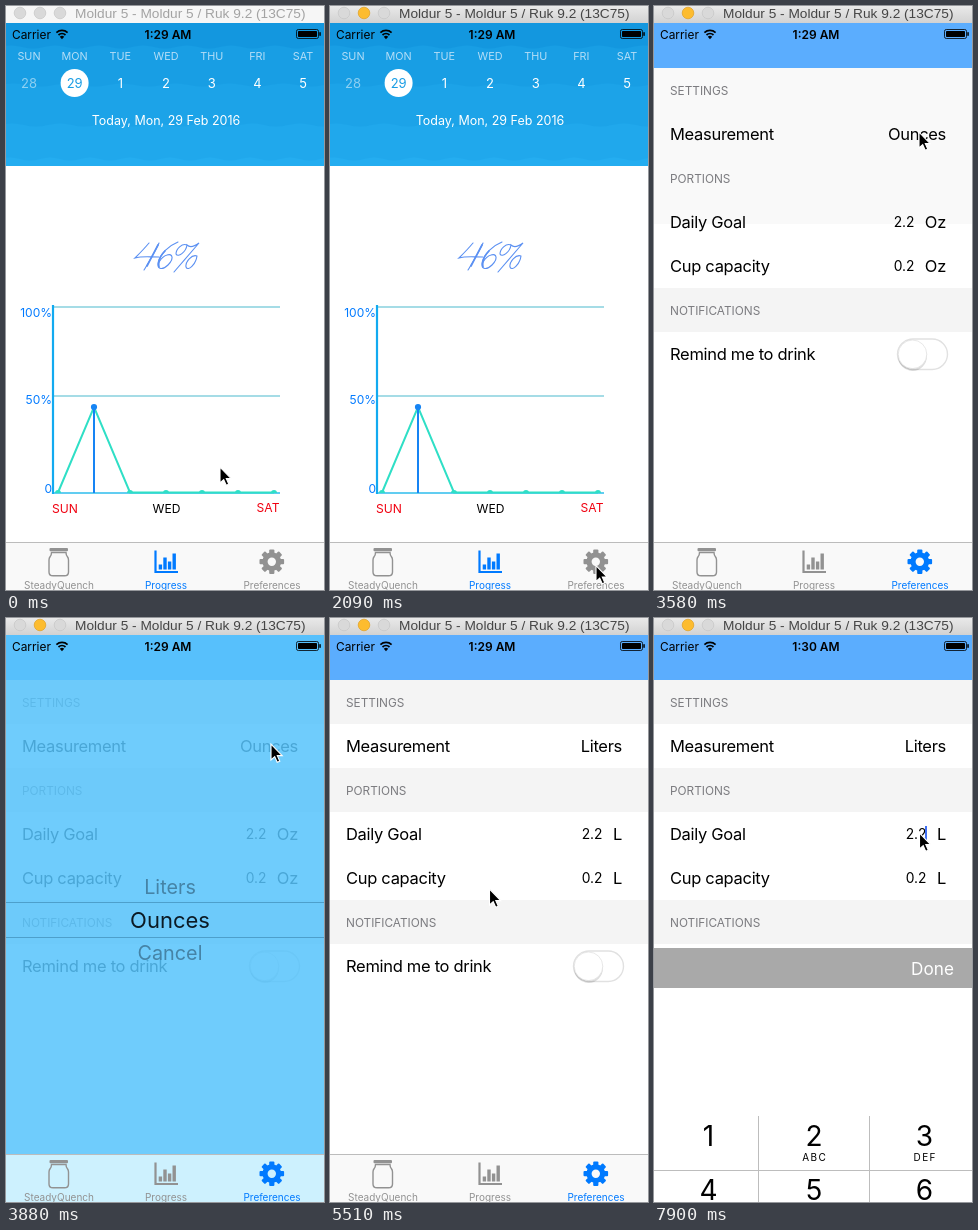
Write an HTML page that moves like this. It is 318 by 584 pixels and loops after 8 s.

```html
<!DOCTYPE html>
<html lang="en">
<head>
<meta charset="utf-8">
<title>Hydration app</title>
<style>
  html, body { margin: 0; width: 100%; height: 100%; overflow: hidden; background: #fff; }
  svg { display: block; width: 100vw; height: 100vh; font-family: Inter, Roboto, sans-serif; }
  .mid { text-anchor: middle; }
  .end { text-anchor: end; }
  .row { font-size: 16.5px; letter-spacing: -.3px; }
  .head { font-size: 11.8px; fill: #7b7b7f; }
  .line { fill: none; stroke: currentColor; }
</style>
</head>
<body>
<svg id="stage" viewBox="0 0 318 584"></svg>
<script>
const LOOP = 8000, STEP = 148.3;
const BLUE = '#007aff', GRAY = '#929292';

const rect = (x, y, w, h, fill, more = '') =>
  `<rect x="${x}" y="${y}" width="${w}" height="${h}" fill="${fill}" ${more}/>`;
const dot = (x, y, r, fill, more = '') =>
  `<circle cx="${x}" cy="${y}" r="${r}" fill="${fill}" ${more}/>`;
const line = (x1, y1, x2, y2, color, w = 1) =>
  `<path d="M${x1} ${y1}L${x2} ${y2}" stroke="${color}" stroke-width="${w}" fill="none"/>`;
const text = (x, y, s, size, cls = '', more = '') =>
  `<text x="${x}" y="${y}" font-size="${size}" class="${cls}" ${more}>${s}</text>`;
const group = (id, body, more = '') => `<g id="${id}" ${more}>${body}</g>`;
const range = n => [...Array(n).keys()];

// Title bar of the simulator window
const titleBar = () =>
  rect(0, 0, 318, 17, '#f6f6f6', 'id="bar"') +
  range(3).map(i => dot(14 + 20 * i, 7, 5.8, '#d9d9d9', `id="light${i}" stroke="#c6c6c6" stroke-width=".7"`)).join('') +
  text(69, 12, 'Moldur 5 - Moldur 5 / Ruk 9.2 (13C75)', 13.7, '',
    'id="title" font-family="Liberation Sans, Arial, sans-serif"');

const statusBar = () =>
  text(6, 32.5, 'Carrier', 11.9) +
  `<g class="line" stroke-width="1.7"><path d="M50.4 26.6a8.2 8.2 0 0 1 11.2 0M52.5 29a5.2 5.2 0 0 1 7 0"/></g>
   <path d="M53.8 30.8a3.2 3.2 0 0 1 4.4 0L56 33.2z"/>` +
  text(162, 32.5, '1:29 AM', 12, 'mid', 'id="clock" font-weight="600"') +
  rect(290.5, 23.5, 22, 9, 'none', 'rx="1.8" stroke="#000" stroke-width=".8"') +
  rect(292, 25, 19, 6, '#000', 'rx=".7"') +
  rect(313.3, 26, 1.5, 4, '#000', 'rx=".7"');

// Water layer with a scalloped upper edge
const wave = (y, width, fill) => {
  const n = Math.ceil(330 / width);
  const bumps = range(n).map(i => `q${width / 2} ${i % 2 ? 3 : -3} ${width} 0`).join('');
  return `<path d="M-6 ${y}${bumps}V160H-6z" fill="${fill}"/>`;
};

const calendar = () => {
  const days = ['SUN', 'MON', 'TUE', 'WED', 'THU', 'FRI', 'SAT'];
  const dates = [28, 29, 1, 2, 3, 4, 5];
  const col = i => 23 + 45.67 * i;
  return rect(0, 17, 318, 143, '#1397df') +
    wave(41, 22, '#189ee4') + wave(79, 27, '#1ca3e8') + wave(119, 24, '#20a8ec') + wave(153, 20, '#24adf0') +
    dot(68.6, 77, 14, '#fff') +
    days.map((d, i) => text(col(i), 54, d, 10.8, 'mid', 'fill="#b5def7"')).join('') +
    dates.map((d, i) => text(col(i), 81.5, d, 13, 'mid',
      `fill="${i == 1 ? '#1a9de4' : '#fff'}" opacity="${i ? 1 : .5}"`)).join('') +
    text(160, 118.5, 'Today, Mon, 29 Feb 2016', 12.5, 'mid', 'fill="#fff"');
};

// Thin calligraphic figure
const percent = () => `<g role="img" aria-label="46%" fill="none" stroke="#5b90f2" stroke-width="1.1" stroke-linecap="round">
  <path d="M143 237C138 243 133 248 129 252C136 250 142 251 153 251M153 237C149 246 144 254 138 264"/>
  <path d="M172 236C162 240 154 248 152 257C151 264 157 264 162 259C168 253 167 247 161 249C157 250 154 254 152 258"/>
  <path d="M181 239C176 237 170 243 170 248C172 252 180 246 181 239C184 242 189 240 193 237L168 266"/>
  <path d="M191 250C186 248 179 256 180 261C182 266 190 258 191 250"/>
  <path d="M152 239L141 260M159 245C154 250 152 256 153 261" stroke-width="1.7"/></g>`;

const chart = () => {
  const xs = range(7).map(i => 52 + 36 * i), base = 486.5, teal = '#2fdfc6';
  return line(47, 301, 274, 301, '#a5dce6', 2) + line(47, 390, 274, 390, '#a5dce6', 2) +
    line(46, 487, 274, 487, '#2cbcec', 1.6) + line(47, 299, 47, 488, '#12aaf0', 2.2) +
    `<path d="M52 ${base}L88 401L124 ${base}H268" fill="none" stroke="${teal}" stroke-width="2"/>` +
    xs.map(x => x == 88 ? '' : `<path d="M${x - 3} 487a3 3 0 0 1 6 0z" fill="${teal}"/>`).join('') +
    line(88, 401, 88, 487, '#1684f4', 2) + dot(88, 401, 3.1, '#1684f4') +
    [['100%', 311], ['50%', 398], ['0', 487]].map(([s, y]) => text(46, y, s, 12, 'end', `fill="${BLUE}"`)).join('') +
    text(46, 507, 'SUN', 12.1, '', 'fill="#f00010"') +
    text(160.5, 507, 'WED', 12.1, 'mid') +
    text(273.5, 506, 'SAT', 12.1, 'end', 'fill="#f00010"');
};

const settings = () => {
  const head = (y, s) => text(16, y, s, 12, 'head');
  const row = (y, s) => text(16, y, s, 17, 'row');
  return rect(0, 17, 318, 45, '#5badfe') +
    [62, 150, 282].map(y => rect(0, y, 318, 44, '#f4f4f4')).join('') +
    rect(0, 62, 318, 156, '#f9f9f9', 'id="tint"') +
    head(88.5, 'SETTINGS') + head(176.5, 'PORTIONS') + head(308.5, 'NOTIFICATIONS') +
    row(134, 'Measurement') + row(222, 'Daily Goal') + row(266, 'Cup capacity') + row(354, 'Remind me to drink') +
    text(292, 134, '', 17, 'row end', 'id="measure"') +
    [['2.2', 222], ['0.2', 266]].map(([v, y], i) =>
      text(0, y - 1, v, 13.8, 'end', `id="value${i}"`) + text(292, y, '', 17, 'row end', `id="unit${i}"`)).join('') +
    rect(243.5, 333, 50, 30.5, '#fff', 'rx="15.2" stroke="#e1e1e1" stroke-width="1.4"') +
    dot(258.5, 350.6, 14.4, '#000', 'opacity=".13"') +
    dot(258.5, 348.3, 14.3, '#fff', 'stroke="#d9d9d9" stroke-width=".6"');
};

const options = ['Liters', 'Ounces', 'Cancel'];
const picker = () =>
  rect(0, 17, 318, 520, '#56c3fc', 'opacity=".85"') +
  line(0, 284.5, 318, 284.5, '#4d9fcb') + line(0, 319.5, 318, 319.5, '#4d9fcb') +
  options.map((s, i) => text(164, 0, s, 20, 'mid', `id="option${i}"`)).join('');

const tabs = () => {
  const jar = rect(43.5, 542, 18.5, 3.2, 'currentColor', 'rx="1"') +
    '<path class="line" stroke-width="1.4" d="M45.5 546.5H60Q60 549 61.3 550.5Q62.5 552 62.5 554V566Q62.5 569.8 58.5 569.8H47Q43 569.8 43 566V554Q43 552 44.2 550.5Q45.5 549 45.5 546.5z"/>';
  const bars = '<path class="line" stroke-width="2.2" d="M149.5 544.5V566H172"/>' +
    [5, 12, 8, 16].map((h, i) => rect(152.7 + 4.6 * i, 563.5 - h, 3.4, h, 'currentColor')).join('');
  const gear = '<g transform="translate(265.8 555.7)"><circle class="line" r="6.8" stroke-width="5.2"/>' +
    range(8).map(i => rect(-2.6, -12.3, 5.2, 5, 'currentColor', `rx="1" transform="rotate(${45 * i})"`)).join('') + '</g>';
  return rect(0, 536, 318, 48, '#f9f9f9', 'id="tabBack"') + line(0, 536.5, 318, 536.5, '#bcbcbc') +
    [[53, 'SteadyQuench', jar], [160, 'Progress', bars], [266, 'Preferences', gear]].map(([x, s, icon], i) =>
      group('tab' + i, icon + text(x, 582.5, s, 10, 'mid', 'fill="currentColor"'))).join('');
};

const keypad = () => {
  const key = (x, y, n, letters) => text(x, y, n, 28, 'mid') +
    text(x + .7, y + 15, letters, 10, 'mid', 'letter-spacing="1.4"');
  return rect(0, 326, 318, 258, '#fff') + rect(0, 330, 318, 40, '#a9a9a9') +
    text(300, 356.5, 'Done', 17.2, 'end', 'fill="#fff"') +
    line(104.5, 498, 104.5, 584, '#bdbdbd') + line(215.5, 498, 215.5, 584, '#bdbdbd') +
    line(0, 552.5, 318, 552.5, '#bdbdbd') +
    ['', 'ABC', 'DEF', 'GHI', 'JKL', 'MNO'].map((s, i) =>
      key([54.5, 160, 270.5][i % 3], i < 3 ? 528 : 582, i + 1, s)).join('') +
    rect(271, 208, 2, 15.5, '#3f6ff2');
};

const pointer = '<path d="M0 0V16L3.7 12.6L6.2 18.3L8.8 17.2L6.3 11.6H11.2z" fill="#000" stroke="#fff" stroke-width="1.1"/>';

document.getElementById('stage').innerHTML =
  `<defs><linearGradient id="chrome" x2="0" y2="1"><stop stop-color="#e9e9e9"/><stop offset="1" stop-color="#d2d2d2"/></linearGradient></defs>` +
  rect(0, 0, 318, 584, '#fff') +
  group('progress', calendar() + percent() + chart()) +
  group('settings', settings()) + group('picker', picker()) +
  group('tabs', tabs()) + group('keypad', keypad()) +
  titleBar() + statusBar() + group('pointer', pointer);

const el = {};
document.querySelectorAll('[id]').forEach(e => el[e.id] = e);
const show = (id, on) => el[id].style.display = on ? '' : 'none';
const set = (id, attrs) => Object.entries(attrs).forEach(([k, v]) => el[id].setAttribute(k, v));
const write = (id, s) => { if (el[id].textContent !== s) el[id].textContent = s; };

// Pointer trips: start time, then one stop per step
const trips = [
  [1050, [[197, 470], [181, 486], [183, 508], [211, 534], [248, 552], [266, 559.5]]],
  [2690, [[262, 530], [235, 390], [188, 200], [161, 50], [214, 6], [256, 152], [265, 126]]],
  [4320, [[243, 160], [200, 222], [164, 266], [159.5, 271]]],
  [5960, [[163, 268], [182, 254], [214, 236], [245, 222], [262, 216], [265.5, 215]]]
];
function pointerAt(t) {
  let at = [214, 461];
  for (const [start, stops] of trips)
    if (t >= start) at = stops[Math.min(stops.length - 1, Math.floor((t - start) / STEP))];
  return at;
}

function drawPicker(t) {
  const pos = t < 5210 ? 1 : t < 5360 ? .55 : .05;
  options.forEach((_, i) => {
    const d = i - pos, picked = Math.abs(d) < .5, size = picked ? 22 : 19.8;
    set('option' + i, {
      y: 302 + 119 * Math.sin(.28 * d) + size * .364,
      'font-size': size, fill: picked ? '#0b1a24' : '#4583a6'
    });
  });
}

function draw(t) {
  const active = t >= 2090, prefs = t >= 2240, picking = t >= 3880 && t < 5510;
  const liters = t >= 5510, typing = t >= 7900;

  set('bar', { fill: active ? 'url(#chrome)' : '#f6f6f6' });
  set('light1', { fill: active ? '#fdbc2f' : '#d9d9d9', stroke: active ? '#e0a022' : '#c6c6c6' });
  set('title', { fill: active ? '#454545' : '#a3a3a3' });
  write('clock', typing ? '1:30 AM' : '1:29 AM');

  show('progress', !prefs);
  show('settings', prefs);
  show('tint', t < 3880);
  show('picker', picking);
  show('keypad', typing);
  show('tabs', !typing);

  write('measure', liters ? 'Liters' : 'Ounces');
  for (const i of [0, 1]) {
    write('unit' + i, liters ? 'L' : 'Oz');
    set('value' + i, { x: liters ? 272.5 : 260.5 });
  }
  set('tabBack', { fill: picking ? '#cdf1fe' : '#f9f9f9' });
  range(3).forEach(i => el['tab' + i].style.color = i == (prefs ? 2 : 1) ? BLUE : GRAY);
  if (picking) drawPicker(t);

  set('pointer', { transform: `translate(${pointerAt(t)})` });
}

const begin = performance.now();
function tick() {
  draw((performance.now() - begin) % LOOP);
  requestAnimationFrame(tick);
}
tick();
</script>
</body>
</html>
```
